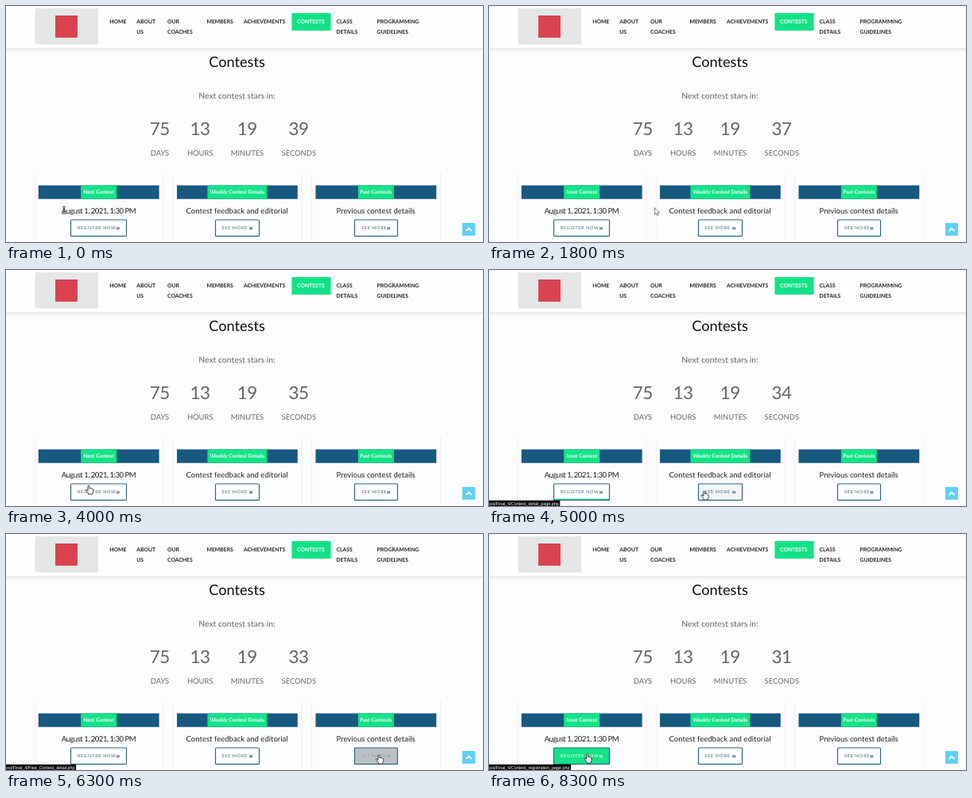
An HTML page for the animation above (8.4 s loop, 600 by 298 pixels).

```html
<!DOCTYPE html>
<html lang="en">
<head>
<meta charset="utf-8">
<title>Contests</title>
<style>
  html, body { margin: 0; width: 100%; height: 100%; overflow: hidden; background: #fdfcfe; }
  svg { display: block; width: 600px; height: 298px; text-rendering: geometricPrecision; }
  text { font-family: Lato, "Noto Sans", sans-serif; white-space: pre; }
  .nav { font-size: 6.8px; font-weight: 700; fill: #222; }
  .title { font-size: 18.2px; fill: #111; }
  .lead { font-size: 10.4px; fill: #666; }
  .digits { font-size: 22.4px; letter-spacing: -.4px; fill: #666; }
  .unit { font-size: 9.4px; fill: #666; }
  .badge { font-size: 6.6px; font-weight: 700; fill: #fff; }
  .info { font-size: 9.55px; fill: #222; }
  .date { letter-spacing: -.5px; }
  .btn { font-size: 5.5px; letter-spacing: .65px; }
  .arrow { font: 700 8.4px "Open Sans", sans-serif; letter-spacing: 0; }
  .status { font: 5.4px "Liberation Sans", Arial, sans-serif; fill: #fff; }
  .mid { text-anchor: middle; }
</style>
</head>
<body>
<svg id="stage" viewBox="0 0 600 298" xmlns="http://www.w3.org/2000/svg">
  <defs>
    <linearGradient id="shade" x2="0" y2="1">
      <stop offset="0" stop-color="#e6e6e8"/>
      <stop offset="1" stop-color="#fdfcfe"/>
    </linearGradient>
    <clipPath id="selClip"><rect id="selArea" x="70" y="250" height="18"/></clipPath>
  </defs>

  <rect width="600" height="298" fill="#fdfcfe"/>
  <rect y="53" width="600" height="5" fill="url(#shade)"/>
  <rect width="600" height="53" fill="#fefefe"/>
  <rect x="36.5" y="3" width="79.5" height="45.5" fill="#e5e6e6"/>
  <rect x="62" y="12" width="28" height="28" fill="#d9434f"/>
  <rect x="359.4" y="9" width="49.2" height="22" fill="#13e287"/>
  <g id="nav"></g>

  <text class="title mid" x="290.5" y="77">Contests</text>
  <text class="lead mid" x="290.5" y="116.7">Next contest stars in:</text>
  <g id="clock"></g>
  <g id="cards"></g>

  <g id="selection">
    <rect id="selBox" x="70" y="250.5" height="16.5" fill="#3390f0"/>
    <text class="info date mid" x="116.3" y="261.5" style="fill:#fff" clip-path="url(#selClip)">August 1, 2021, 1:30 PM</text>
  </g>

  <rect x="574" y="274" width="16" height="16" fill="#5fd0f6"/>
  <path d="M578.7 284.2l3.4-3.6 3.4 3.6" fill="none" stroke="#fff" stroke-width="1.7"/>

  <g id="status">
    <rect id="statusBox" y="291" height="8" fill="#0a0a0a"/>
    <text id="statusText" class="status" x="0" y="296.9"></text>
  </g>

  <g id="cursor">
    <path id="beam" d="M-1.8-4.5h1.3l.5.5.5-.5h1.3M0-4v8M-1.8 4.5h1.3l.5-.5.5.5h1.3" fill="none" stroke="#222" stroke-width=".9"/>
    <path id="pointer" d="M0 0v8.6l2-1.8 1.4 3 1.4-.6-1.4-2.9h2.7z" fill="#fff" stroke="#444" stroke-width=".7" stroke-linejoin="round"/>
    <path id="hand" d="M-1 .8q1-1.5 2 0v3.2l.4-.6q1.2-.4 1.4.5 1.3-.4 1.5.5 1.3-.2 1.3 1v2.2q0 1.4-1 2.4v1.2h-5v-1.2l-3-3.7q-.4-1.3.8-1.2l1.6 1.3z" fill="#fff" stroke="#222" stroke-width=".85" stroke-linejoin="round"/>
  </g>
</svg>
<script>
const LOOP = 8400, FRAME = 100, FIRST_TICK = 600;
const GREEN = '#13e287', BLUE = '#17597f';
const NS = 'http://www.w3.org/2000/svg';
const $ = id => document.getElementById(id);

function add(parent, tag, attrs, content = '') {
  const el = document.createElementNS(NS, tag);
  for (const key in attrs) el.setAttribute(key, attrs[key]);
  el.textContent = content;
  return parent.appendChild(el);
}
const label = (parent, cls, x, y, content) => add(parent, 'text', { class: cls, x, y }, content);
const box = (parent, x, y, width, height, fill, more) =>
  add(parent, 'rect', { x, y, width, height, fill, ...more });

const menu = [
  [130.3, 'HOME'], [164.3, 'ABOUT', 'US'], [203, 'OUR', 'COACHES'], [252.5, 'MEMBERS'],
  [299, 'ACHIEVEMENTS'], [366, 'CONTESTS'], [415.5, 'CLASS', 'DETAILS'],
  [466.5, 'PROGRAMMING', 'GUIDELINES']
];
for (const [x, ...lines] of menu)
  lines.forEach((line, i) => {
    const el = label($('nav'), 'nav', x, 21.6 + i * 13, line);
    if (line === 'CONTESTS') el.style.fill = '#fff';
  });

const units = [[193.3, '75', 'DAYS'], [244, '13', 'HOURS'], [303.3, '19', 'MINUTES'], [368.1, '39', 'SECONDS']];
const digits = units.map(([x, value, name]) => {
  label($('clock'), 'unit mid', x + .2, 189.1, name);
  return label($('clock'), 'digits mid', x, 162.8, value);
});
const seconds = digits[3];

// hover: [enter, leave] times of the pointer over the button
const cards = [
  { x: 36, badge: 'Next Contest', badgeW: 45, info: 'August 1, 2021, 1:30 PM', cls: ' date',
    btn: 'REGISTER NOW', btnX: 81, btnW: 71, textX: 90, arrowX: 138.2, hover: [[4000, 4680], [7642, LOOP]] },
  { x: 210.2, badge: 'Weekly Contest Details', badgeW: 75, info: 'Contest feedback and editorial', cls: '',
    btn: 'SEE MORE', btnX: 263, btnW: 56, textX: 271.5, arrowX: 305.5, hover: [[4990, 5922], [7304, 7417]] },
  { x: 384.7, badge: 'Past Contests', badgeW: 45, info: 'Previous contest details', cls: '',
    btn: 'SEE MORE', btnX: 438, btnW: 55, textX: 447, arrowX: 478.7, hover: [[6245, 7063]] }
];
for (const c of cards) {
  const g = $('cards'), mid = c.x + 80.7;
  for (const side of [c.x, c.x + 162]) box(g, side - .5, 211, 1, 87, '#f1f0f3');
  box(g, c.x + 4.8, 226.5, 151.8, 17.2, BLUE);
  box(g, mid - c.badgeW / 2, 226.5, c.badgeW, 17.2, GREEN);
  label(g, 'badge mid', mid, 237.3, c.badge);
  label(g, 'info mid' + c.cls, mid - .3, 261.5, c.info);
  c.face = box(g, c.btnX, 270, c.btnW, 21, '#fff');
  c.fill = box(g, c.btnX, 291, c.btnW, 0, GREEN);
  box(g, c.btnX + .5, 270, c.btnW - 1, 20.7, 'none', { stroke: '#2c688b', 'stroke-width': 1.2, rx: 1 });
  c.texts = [label(g, 'btn', c.textX, 282, c.btn), label(g, 'btn arrow', c.arrowX, 282.5, '»')];
}

const clamp = v => Math.min(1, Math.max(0, v));
const ease = k => k * k * (3 - 2 * k);
const mix = (a, b, k) => `rgb(${a.map((v, i) => Math.round(v + (b[i] - v) * k))})`;

// Pointer path: time, x, y
const path = [
  [0, 73, 258], [100, 74, 258], [700, 163, 258], [800, 166, 254.5], [900, 166, 254.5], [1000, 167.5, 267],
  [1300, 167.5, 267], [1600, 185, 262], [2200, 255, 240], [2800, 374, 176], [2900, 374, 176],
  [3100, 340, 216], [3300, 340, 216], [4000, 104, 272], [4550, 104, 272], [5000, 270.5, 279],
  [5800, 270.5, 279], [6300, 469, 279], [7000, 469, 279], [7700, 123.5, 278], [LOOP, 123.5, 278]
];
function pointAt(t) {
  const i = path.findIndex(p => p[0] > t);
  const [a, b] = [path[i - 1], path[i]];
  const k = (t - a[0]) / (b[0] - a[0]);
  return [a[1] + (b[1] - a[1]) * k, a[2] + (b[2] - a[2]) * k];
}

const links = [
  [4300, 'Contest_registration_page'], [4990, 'Contest_detail_page'], [6245, 'Past_Contest_detail'],
  [7304, 'Contest_detail_page'], [7642, 'Contest_registration_page']
];

// Level of a hover transition lasting ms, rising on enter and falling on leave
const level = (hover, t, ms) => Math.max(...hover.map(([enter, leave]) =>
  Math.min(clamp((t - enter) / ms), clamp((leave - enter) / ms) - clamp((t - leave) / ms))), 0);

const show = (el, on) => { el.style.display = on ? '' : 'none'; };
let statusLink = '';

function draw(t) {
  seconds.textContent = 39 - Math.max(0, Math.floor((t - FIRST_TICK) / 1000) + 1);

  let over = false;
  for (const c of cards) {
    const tint = level(c.hover, t, 120), rise = 21 * ease(level(c.hover, t, 400));
    c.face.setAttribute('fill', mix([255, 255, 255], [108, 117, 125], tint));
    c.fill.setAttribute('y', 291 - rise);
    c.fill.setAttribute('height', rise);
    for (const el of c.texts) el.style.fill = mix([72, 96, 115], [255, 255, 255], ease(tint));
    over = over || c.hover.some(([enter, leave]) => t >= enter && t < leave);
  }

  const [x, y] = pointAt(t);
  $('cursor').setAttribute('transform', `translate(${x} ${y})`);
  const typing = t < 800;
  show($('beam'), typing);
  show($('hand'), over);
  show($('pointer'), !typing && !over);

  const selected = t >= 100 && t < 1500;
  const width = selected ? (typing ? Math.min(93, x - 70) : 93) : 0;
  show($('selection'), selected);
  $('selBox').setAttribute('width', width);
  $('selArea').setAttribute('width', width);

  const link = links.filter(l => l[0] <= t).pop();
  show($('status'), link);
  if (link && link[1] !== statusLink) {
    statusLink = link[1];
    $('statusText').textContent = `ost/Final_4/${statusLink}.php`;
    $('statusBox').setAttribute('width', $('statusText').getComputedTextLength() + 1.5);
  }
}

const start = performance.now();
function loop() {
  const t = (performance.now() - start) % LOOP;
  draw(Math.floor(t / FRAME) * FRAME);
  requestAnimationFrame(loop);
}
loop();
</script>
</body>
</html>
```
